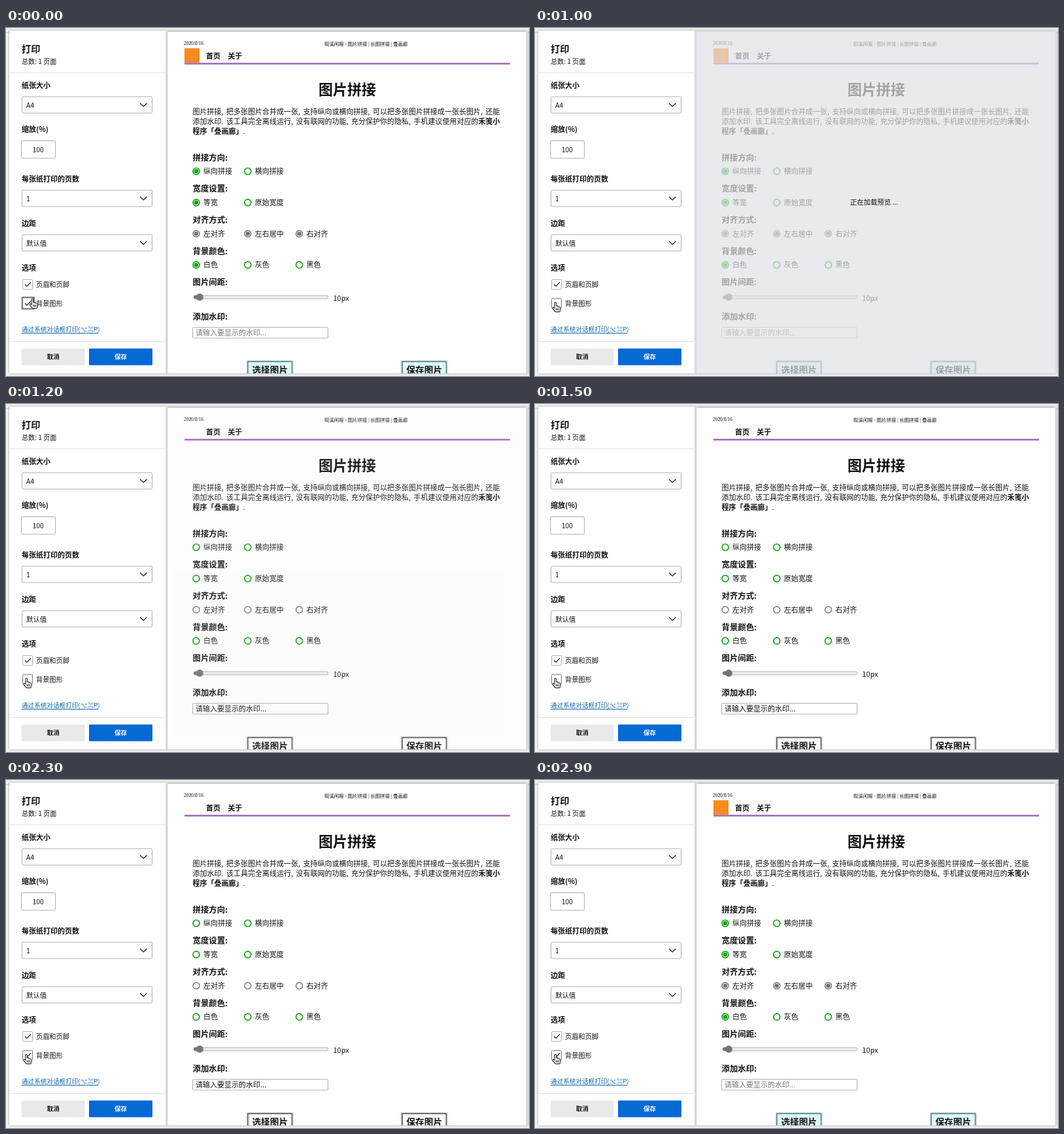
Animation, 800 px wide and 532 px high, one loop 3 s. Source, as an HTML page:

```html
<!DOCTYPE html>
<html lang="zh-CN">
<head>
<meta charset="utf-8">
<title>打印预览</title>
<style>
  html, body { margin: 0; width: 800px; height: 532px; overflow: hidden; background: #f1f1f1; }
  svg { display: block; }
  text { font-family: "Noto Sans CJK SC", "Noto Sans", sans-serif; fill: #111; white-space: pre; }
  .b { font-weight: 700; }
  .m { font-weight: 500; }
  .serif { font-family: "Liberation Serif", "Noto Sans CJK SC", serif; }
  .mid { text-anchor: middle; }
  .wide { word-spacing: 2px; }
  .box { fill: #fff; stroke: #b0b0b0; }
  .line { fill: none; stroke: #222; stroke-width: 1.2; }
  .ring { fill: #fff; stroke: #16a316; stroke-width: 1.7; }
  .ring.off { stroke: #757575; stroke-width: 1.4; }
  .dot { fill: #12a60f; }
  .dot.off { fill: #757575; }
  .btn { fill: #fff; stroke: #666; stroke-width: 1.8; }
  .color .btn { fill: #dffcfc; stroke: #5f8f92; }
  .color .hint { fill: #777; }
  #preview:not(.color) .ink { display: none; }
</style>
</head>
<body>
<svg id="stage" width="800" height="532" viewBox="0 0 800 532"></svg>
<script>
const text = (x, y, size, str, cls = '', extra = '') =>
  `<text x="${x}" y="${y}" font-size="${size}" class="${cls}" ${extra}>${str}</text>`;
const rect = (x, y, w, h, attrs) =>
  `<rect x="${x}" y="${y}" width="${w}" height="${h}" ${attrs}/>`;

const select = (y, label, value) =>
  text(24, y - 26, 11, label, 'b') +
  rect(24.5, y - 12.5, 199, 25, 'rx="1.5" class="box"') +
  text(31, y + 4, 10.4, value) +
  `<path class="line" d="M205 ${y - 2.5}l5.2 5 5.2-5"/>`;

const tick = y => `<path class="line" d="M29 ${y}l3 3 6-6.5"/>`;

// Each option is [label, dot]; disabled rows are grey.
const radios = (y, heading, options, off = '') =>
  text(285.5, y - 16.5, 12.4, heading, 'b') +
  options.map(([label, dot], i) => {
    const x = 291 + i * 78.8;
    return `<circle class="ring ${off}" cx="${x}" cy="${y}" r="5"/>` +
      (dot ? `<circle class="dot ink ${off}" cx="${x}" cy="${y}" r="3.3"/>` : '') +
      text(x + 11, y + 4, 11, label);
  }).join('');

const button = (x, label) =>
  rect(x, 510, 67.5, 30, 'class="btn" filter="url(#soft)"') +
  text(x + 33.8, 527.5, 13.7, label, 'b mid');

const sidebar =
  rect(5, 4, 238.5, 524, 'fill="#fff"') +
  text(24, 37, 14.2, '打印', 'b') +
  text(24, 54.5, 10.1, '总数: 1 页面') +
  rect(5, 68, 238.5, 1, 'fill="#e3e3e3"') +
  select(117.5, '纸张大小', 'A4') +
  text(24, 158.5, 11, '缩放(%)', 'b') +
  rect(23.5, 172.5, 52, 26.5, 'rx="1.5" class="box"') +
  text(40.5, 190, 10.4, '100') +
  select(260.5, '每张纸打印的页数', '1') +
  select(328.5, '边距', '默认值') +
  text(24, 371, 11, '选项', 'b') +
  rect(25.5, 384.5, 15, 15, 'rx="1" class="box"') + tick(392) +
  text(46, 396, 10.2, '页眉和页脚') +
  rect(25.5, 413.5, 15, 15, 'rx="1" fill="#fff" stroke="#777"') +
  rect(24.8, 411.8, 18, 17.5, 'id="focus" fill="#fff" stroke="#6b6b6b" stroke-width="2"') +
  `<g id="tick">${tick(421)}</g>` +
  text(46, 424.5, 10.2, '背景图形') +
  text(24, 463.5, 9.6, '通过系统对话框打印(⌥⌘P)', '', 'style="fill:#0a62a8"') +
  rect(24, 466, 117, 1, 'fill="#0a62a8"') +
  rect(5, 479, 238.5, 1, 'fill="#e3e3e3"') +
  rect(24, 490, 96.5, 25.5, 'rx="1" fill="#e9e9e9"') +
  rect(127, 490, 97, 25.5, 'rx="1" fill="#046ad4"') +
  text(72.3, 506.3, 9.5, '取消', 'b mid') +
  text(175.5, 506.3, 9.5, '保存', 'b mid', 'style="fill:#fff"');

const preview =
  rect(247, 6, 548.5, 540, 'fill="#fff" filter="url(#soft)"') +
  text(272, 26, 7.4, '2020/8/16', 'serif') +
  text(487, 27, 7.4, '砚溪闲报 - 图片拼接 | 长图拼接 | 叠画廊', 'serif') +
  rect(273, 31, 23, 22, 'class="ink" fill="#f68b1f"') +
  rect(273, 53.3, 498, 2.4, 'fill="#a65bb9"') +
  text(306, 47, 11, '首页', 'b') + text(339.3, 47, 11, '关于', 'b') +
  text(522, 102, 22, '图片拼接', 'b mid') +
  text(285.5, 132, 11, '图片拼接, 把多张图片合并成一张, 支持纵向或横向拼接, 可以把多张图片拼接成一张长图片, 还能', 'wide') +
  text(285.5, 147, 11, '添加水印. 该工具完全离线运行, 没有联网的功能, 充分保护你的隐私, 手机建议使用对应的<tspan class="b">禾笺小</tspan>', 'wide') +
  text(285.5, 162.3, 11, '<tspan class="b">程序「叠画廊」</tspan>.') +
  radios(219, '拼接方向:', [['纵向拼接', 1], ['横向拼接', 0]]) +
  radios(266.8, '宽度设置:', [['等宽', 1], ['原始宽度', 0]]) +
  radios(314.5, '对齐方式:', [['左对齐', 1], ['左右居中', 1], ['右对齐', 1]], 'off') +
  radios(362.2, '背景颜色:', [['白色', 1], ['灰色', 0], ['黑色', 0]]) +
  text(285.5, 393, 12.4, '图片间距:', 'b') +
  rect(287.5, 409, 205.5, 5, 'rx="2.5" fill="#ededed" stroke="#b3b3b3"') +
  rect(287, 408.7, 10, 5.6, 'rx="2.5" fill="#757575"') +
  '<circle cx="296.3" cy="411.4" r="5.5" fill="#757575"/>' +
  text(500.5, 416.5, 11, '10px') +
  text(285.5, 445.5, 12.4, '添加水印:', 'b') +
  rect(285.5, 457.5, 207, 16.5, 'rx="1" class="box"') +
  text(290, 469.5, 11, '请输入要显示的水印...', 'hint') +
  button(370, '选择图片') + button(606, '保存图片');

const hand = `<path id="hand" fill="#fff" stroke="#222" stroke-width="1.1" stroke-linejoin="round"
  d="M0 9V1.3Q0-.2 1.3-.2T2.6 1.3V5.5Q4.9 4.7 5 6.4 7 5.8 7.2 7.3 9.2 6.8 9.2 8.8V11L8 14.5H1.3L-2.8 9.4Q-3.3 7.4-1.5 7.7Z
  M2.6 9V12M4.5 9V12M6.4 9V12"/>`;

stage.innerHTML = `
  <defs>
    <filter id="soft"><feDropShadow dx="0" dy="0" stdDeviation="1.4" flood-opacity=".4"/></filter>
    <clipPath id="dialog"><rect x="5" y="4" width="793" height="524"/></clipPath>
  </defs>
  ${rect(0, 6, 800, 1, 'fill="#ccc"')}
  ${rect(5, 4, 793, 524, 'fill="#fff" filter="url(#soft)"')}
  <g clip-path="url(#dialog)">
    ${rect(243, 4, 555, 524, 'fill="#e6e8ec"')}
    <g id="preview">${preview}</g>
    <g id="loading">
      ${rect(243, 4, 555, 524, 'fill="#dee1e6" fill-opacity=".7"')}
      ${text(482, 270, 10.4, '正在加载预览 ...')}
    </g>
    ${sidebar}
  </g>
  ${hand}`;

const get = id => document.getElementById(id);
const show = (id, on) => get(id).setAttribute('opacity', +on);
const ramp = (t, a, b) => Math.min(1, Math.max(0, (t - a) / (b - a)));

function draw(now) {
  const t = Math.floor(now % 3000 / 100) * 100; // ten pictures a second
  const move = ramp(t, 0, 300);
  get('hand').setAttribute('transform', `translate(${39.2 - 9.4 * move} ${414 + 5.4 * move})`);
  show('focus', t < 400);
  show('tick', t < 400 || t >= 2200);
  get('preview').classList.toggle('color', t < 1200 || t >= 2500);
  show('loading', t < 1200 ? ramp(t, 700, 900) : t < 1300 ? .12 : 0);
  // The message vanishes as soon as the new page arrives.
  get('loading').lastElementChild.setAttribute('opacity', +(t < 1200));
  requestAnimationFrame(draw);
}
requestAnimationFrame(draw);
</script>
</body>
</html>
```
